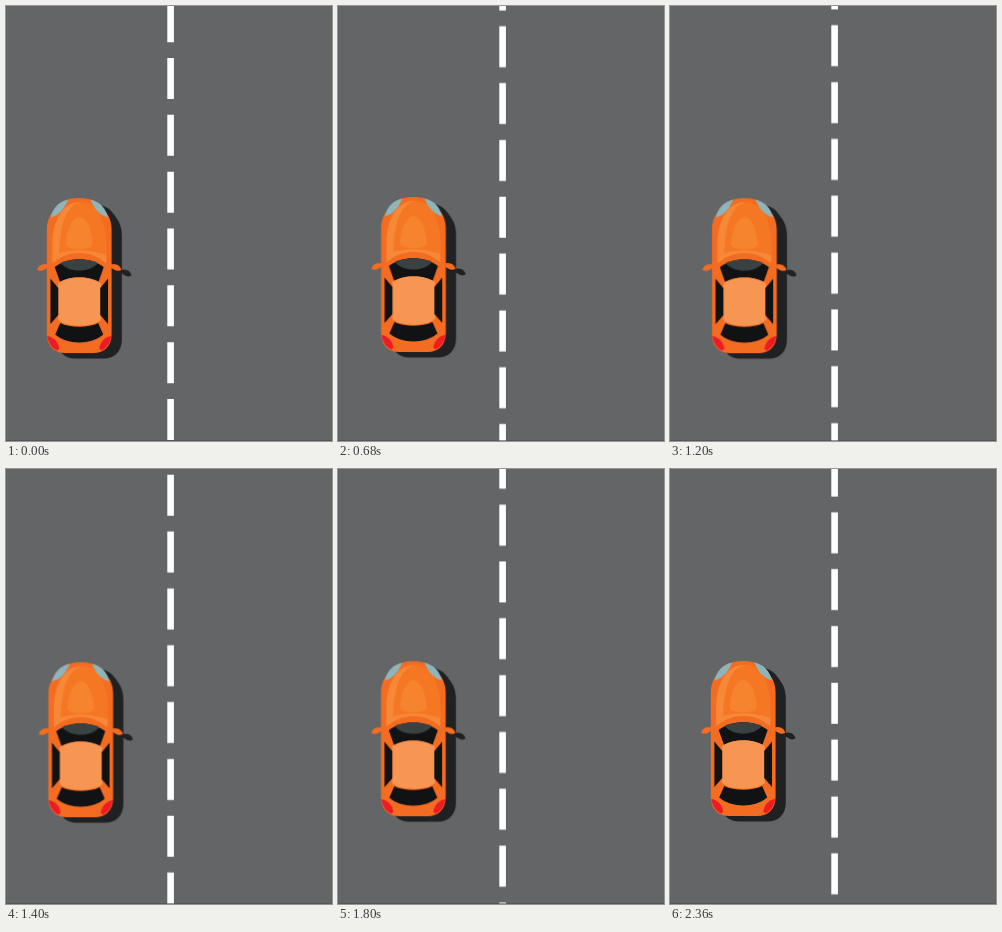
Recreate the animation shown at these times as an HTML page without scripts. Size 326 by 435 pixels, loop 2.4 s.

```html
<!DOCTYPE html>
<html lang="en">
<head>
<meta charset="utf-8">
<title>Car on the road</title>
<style>
  html, body { margin: 0; width: 100%; height: 100%; overflow: hidden; background: #646567; }
  svg { display: block; width: 100%; height: 100%; }

  .lane {
    stroke: #fff; stroke-width: 6.6; stroke-dasharray: 41 15.83;
    animation: lane 2.4s infinite;
  }
  .sway { animation: sway 2.4s ease-in-out infinite; }
  .bounce { animation: bounce 2.4s ease-in-out infinite; }

  /* one step per 40 ms, with a single held step */
  @keyframes lane {
    0% { transform: translateY(0); animation-timing-function: steps(12); }
    20% { transform: translateY(104.03px); animation-timing-function: step-end; }
    21.6667% { transform: translateY(104.03px); animation-timing-function: steps(47); }
    100% { transform: translateY(511.47px); }
  }
  @keyframes sway {
    0%, 100% { transform: translateX(0); animation-timing-function: linear; }
    11.667% { transform: translateX(1.3px); animation-timing-function: ease-out; }
    28.333% { transform: translateX(2.2px); }
    45% { transform: translateX(1px); }
    58.333% { transform: translateX(1.5px); }
    75% { transform: translateX(2.1px); }
    98.333% { transform: translateX(0); }
  }
  @keyframes bounce {
    0%, 98.333%, 100% { transform: translateY(0); }
    11.667% { transform: translateY(1px); }
    28.333% { transform: translateY(-1px); }
    41.667% { transform: translateY(-.9px); }
    58.333% { transform: translateY(1.2px); }
    75% { transform: translateY(.2px); }
  }
</style>
</head>
<body>
<svg viewBox="0 0 326 435">
  <defs>
    <path id="mirror" d="M-31 66.5C-37 64.5-41.5 68-42 72C-38 74-35 72-31 69Z"/>
    <g id="shell">
      <path d="M0 0C14 0 21 5 26 13C30 18 32.4 24 32.4 32V136C32.4 148 25 155 14 155H-14C-25 155-32.4 148-32.4 136V32C-32.4 24-30 18-26 13C-21 5-14 0 0 0Z"/>
      <use href="#mirror"/>
      <use href="#mirror" transform="scale(-1 1)"/>
    </g>
    <g id="side">
      <path fill="#8fb4ba" d="M-28.5 19.5C-27 11-21 3.5-11 1.5C-14 8-18 16-28.5 19.5Z"/>
      <path fill="#111214" d="M-28.8 80.5L-21 90V117L-28.8 126Z"/>
      <path fill="#ed1c24" d="M-32 138C-25 139-21 144-20 150.5L-22 152.5C-28 150-31 144-32 138Z"/>
    </g>
  </defs>

  <rect width="326" height="435" fill="#646567"/>
  <path class="lane" d="M164.6-516.3V440"/>
  <path d="M0 434.5H326" stroke="#4c4d4f" stroke-opacity=".6"/>

  <g class="sway"><g class="bounce"><g transform="translate(73.2 192)">
    <use href="#shell" fill="#202123" transform="translate(10.2 5.6)"/>
    <use href="#shell" fill="#f36c21"/>

    <!-- hood -->
    <path fill="#f68838" d="M0 4C-17 4-27 24-27 46V66C-18 57-8 55 0 55S18 57 27 66V46C27 24 17 4 0 4Z"/>
    <path fill="#f57723" d="M2 4C-12 6-19 24-20 55C-8 51 12 51 27 57V46C27 24 19 4 2 4Z"/>
    <path fill="#f6832e" d="M0 19C-8 19-13 34-13.5 46C-13 53 13 53 13.5 46C13 34 8 19 0 19Z"/>
    <path fill="#f36c21" d="M-28 66C-16 56 16 56 28 66L25 72H-25Z"/>

    <!-- windows and roof -->
    <path fill="#111214" d="M-24.5 69C-12 58.5 12 58.5 24.5 69L19 84.5C10 77.5-10 77.5-19 84.5Z"/>
    <path fill="#3a4142" d="M-18.5 65C-8 60 8 60 18.5 65C11 75-11 75-18.5 65Z"/>
    <path fill="#f79653" d="M-21 85C-13 77.5 13 77.5 21.5 85V122C13 129.5-13 129.5-21 122Z"/>
    <path fill="#111214" d="M-19 125C-9 130 9 130 19 125L24 136.5C12 147-12 147-24 136.5Z"/>

    <use href="#side"/>
    <use href="#side" transform="scale(-1 1)"/>
  </g></g></g>
</svg>
</body>
</html>
```
